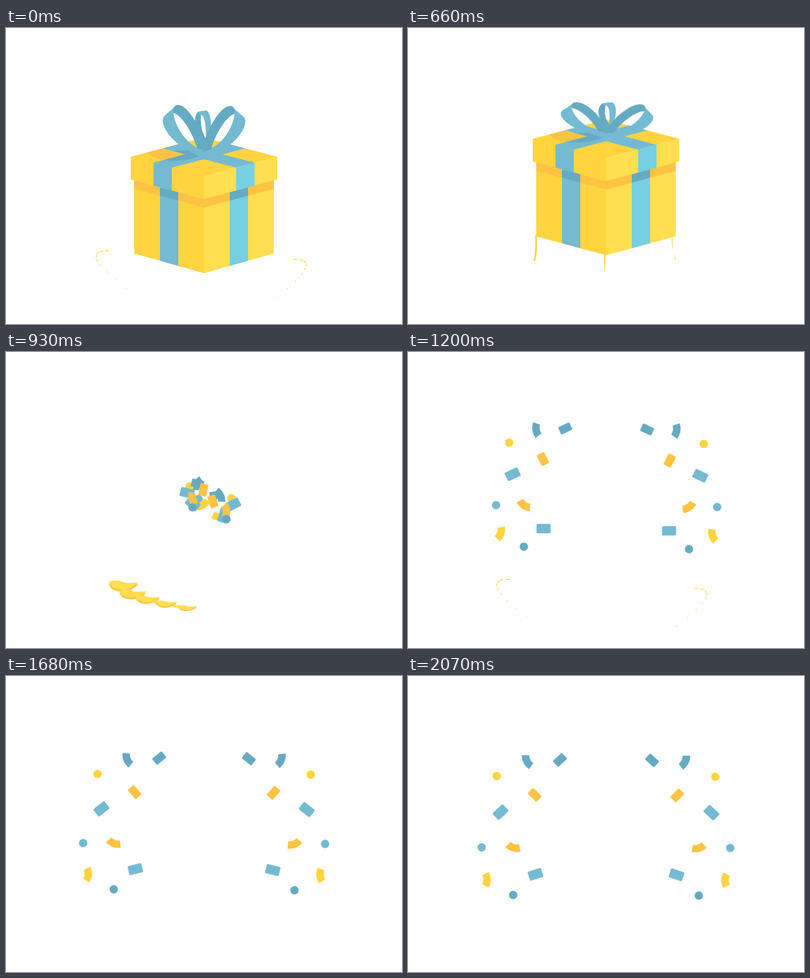
An HTML page that plays this animation: 800x600 px, repeating every 2.1 s.

```html
<!DOCTYPE html>
<html lang="en">
<head>
<meta charset="utf-8">
<title>Gift box</title>
<style>
  html, body { margin: 0; width: 100%; height: 100%; overflow: hidden; background: #fff; }
  svg { display: block; width: 800px; height: 600px; }
  svg * { animation: 2100ms linear 1ms infinite both; }

  .yellow { fill: #ffd43f; }
  .light { fill: #ffde50; }
  .orange { fill: #ffc344; }
  .blue { fill: #74bad2; }
  .sky { fill: #74d0e2; }
  .dark { fill: #65aac3; }

  /* Box: squash, jump, land, vanish */
  .box { animation-name: jump; }
  .lid { animation-name: squash; }
  .face { transform-origin: 400px 497px; animation-name: flatten; }
  .face.l { --skew: -3.65deg; }
  .face.r { --skew: 3.65deg; }
  @keyframes jump {
    0%, 27.14% { transform: translateY(0); animation-timing-function: ease-in; }
    31.43% { transform: translateY(-36.5px); animation-timing-function: cubic-bezier(.3,.4,.5,1); }
    37.14% { transform: translateY(-142px); animation-timing-function: cubic-bezier(.5,0,.9,.6); }
    42.8% { transform: translateY(0); opacity: 1; }
    42.85%, 100% { transform: translateY(0); opacity: 0; }
  }
  @keyframes squash {
    0% { transform: translateY(0); animation-timing-function: ease-in-out; }
    20%, 25.71% { transform: translateY(20.5px); animation-timing-function: ease-in; }
    30%, 100% { transform: translateY(0); }
  }
  @keyframes flatten {
    0% { transform: skewY(0deg); animation-timing-function: ease-in-out; }
    20%, 27.14% { transform: skewY(var(--skew)); }
    32.5%, 100% { transform: skewY(0deg); }
  }

  /* Bow: each loop drags behind the jump */
  .loop { transform-origin: 400px 250px; animation-name: drag; }
  .loop.l { --drag: matrix(1.058, -.055, .051, .702, 0, 0); }
  .loop.r { --drag: matrix(.977, .199, -.225, .751, 0, 0); }
  .loop.m { --drag: matrix(1.1, 0, -.08, .76, 0, 0); }
  @keyframes drag {
    0% { transform: matrix(1, 0, 0, 1, 0, 0); animation-timing-function: ease-in-out; }
    20%, 27.14% { transform: matrix(1, 0, 0, 1.03, 0, 0); }
    31.43%, 33% { transform: var(--drag); animation-timing-function: ease-in-out; }
    37.14% { transform: matrix(1, 0, 0, 1.02, 0, 0); }
    42.8%, 100% { transform: matrix(.92, 0, 0, 1.1, 0, 0); }
  }

  .trail { transform-box: fill-box; transform-origin: center bottom; animation-name: trail; }
  @keyframes trail {
    0%, 29.9% { opacity: 0; transform: none; }
    30%, 31.5% { opacity: 1; transform: none; }
    35% { opacity: 1; transform: scale(.1, .6); }
    35.1%, 100% { opacity: 0; transform: scale(.1, .6); }
  }

  /* Ground dust: thin flakes shrinking to specks */
  .ground { animation-name: ground; }
  .late { animation-name: late; }
  .flake { animation-name: flake; }
  @keyframes ground {
    0%, 20% { transform: translate(3px, -10px); }
    20.1%, 100% { transform: translate(0, 0); }
  }
  @keyframes late {
    0%, 20% { opacity: 1; }
    20.1%, 44.9% { opacity: 0; }
    45%, 100% { opacity: 1; }
  }
  @keyframes flake {
    0%, 1.3% { opacity: 1; transform: var(--end); }
    1.4%, 42.8% { opacity: 0; transform: var(--start); }
    42.85%, 44.29% { opacity: 1; transform: var(--start); animation-timing-function: cubic-bezier(.15,.7,.4,1); }
    54%, 58.4% { opacity: 1; transform: var(--end); }
    58.5%, 100% { opacity: 0; transform: var(--end); }
  }

  /* Confetti: burst, then drift to rest */
  .bit { animation-name: burst; }
  @keyframes burst {
    0%, 42.8% { opacity: 0; transform: translate(405px, 308px) rotate(var(--ar)); }
    42.85% { opacity: 1; transform: translate(405px, 308px) rotate(var(--ar)); }
    44.286% {
      transform: translate(var(--ax), var(--ay)) rotate(var(--ar));
      animation-timing-function: cubic-bezier(.25,.6,.35,1);
    }
    52.857% {
      transform: translate(calc(var(--bx) * 1.17 - var(--cx) * .17), calc(var(--by) * 1.17 - var(--cy) * .17))
        rotate(calc(var(--br) * 1.17 - var(--cr) * .17));
    }
    57.143% {
      transform: translate(var(--bx), var(--by)) rotate(var(--br));
      animation-timing-function: cubic-bezier(.25,.43,.6,.97);
    }
    98.571%, 100% { opacity: 1; transform: translate(var(--cx), var(--cy)) rotate(var(--cr)); }
  }
</style>
</head>
<body>
<svg viewBox="0 0 800 600">
  <defs>
    <clipPath id="top"><path d="M252 261L400 222L548 261L400 300Z"/></clipPath>
    <clipPath id="cross">
      <path d="M298 273L446 234L483 244L335 283Z"/>
      <path d="M502 273L354 234L317 244L465 283Z"/>
    </clipPath>
    <path id="shade" d="M286 252L314 244Q322 248 338 249Q360 250 375 246L394 259Q366 269 336 269Q298 268 286 252Z"/>
    <g id="loop">
      <path class="dark" d="M338 174C335 162 341 156 347 156C362 156 377 179 385 194C395 213 402 232 403 249L386 243C374 205 352 175 338 172Z"/>
      <path class="blue" d="M346 156L321 177C308 188 325 222 360 243L400 266L404 250L386 243C360 228 342 200 338 172C337 164 339 158 346 156Z"/>
    </g>
  </defs>

  <g class="yellow">
    <path class="trail" d="M257 420H260Q262 450 258 466L257 473L254 470Q258 452 257 420Z"/>
    <path class="trail" d="M396 459H399L398 497L396 480Z"/>
    <path class="trail" d="M533 424H534L535 450L533 438ZM537 457L541 470L539 470Z"/>
  </g>

  <g class="box">
    <g class="face l">
      <path class="yellow" d="M259 300V457L400 497V330Z"/>
      <path class="blue" d="M311 300V471.800L348 482.200V310Z"/>
    </g>
    <g class="face r">
      <path class="light" d="M541 300V457L400 497V330Z"/>
      <path class="sky" d="M489 300V471.800L452 482.200V310Z"/>
    </g>
    <g class="lid">
      <path class="orange" d="M259 300V326L400 364L541 326V300Z"/>
      <path class="dark" d="M311 300V340L348 350V300ZM489 300V340L452 350V300Z"/>
      <path class="yellow" d="M252 261L400 222L548 261L400 300V347L252 307Z"/>
      <use href="#shade" class="orange" clip-path="url(#top)"/>
      <path class="blue" d="M298 273L446 234L483 244L335 283Z"/>
      <path class="blue" d="M502 273L354 234L317 244L465 283Z"/>
      <use href="#shade" class="dark" clip-path="url(#cross)"/>
      <path class="light" d="M400 300L548 261V307L400 347Z"/>
      <path class="blue" d="M298 273L335 283V329.400L298 319.400Z"/>
      <path class="sky" d="M502 273L465 283V329.400L502 319.400Z"/>
      <g class="loop m">
        <path class="dark" d="M388 170C380 178 380 195 386 210L401 248L404 225C396 212 392 195 394 175Z"/>
        <path class="blue" d="M386 171Q388 169 404 167C414 168 418 205 410 222L403 235C405 215 404 180 394 175Q388 173 386 171Z"/>
      </g>
      <g class="loop l"><use href="#loop"/></g>
      <g class="loop r"><use href="#loop" transform="matrix(-1 0 0 1 800 2)"/></g>
    </g>
  </g>

  <g class="ground">
    <g id="dustL"></g>
    <g class="late"><g id="dustR" transform="matrix(-1 0 0 1 783 18)"></g></g>
  </g>
  <g id="confetti"></g>
</svg>

<script>
  const SVG = 'http://www.w3.org/2000/svg';

  function add(parent, tag, attrs) {
    const el = document.createElementNS(SVG, tag);
    for (const key in attrs) el.setAttribute(key, attrs[key]);
    return parent.appendChild(el);
  }

  const rect = (w, h) => ['rect', { x: -w / 2, y: -h / 2, width: w, height: h, rx: 2.5 }];
  const shapes = {
    dot: ['circle', { r: 8.5 }],
    small: rect(25, 16.5),
    big: rect(28.5, 19),
    arc: ['path', { d: 'M3.7-15.9A35 35 0 0 1 3.7 15.9L-9.7 9.1A20 20 0 0 0-9.7-9.1Z' }]
  };

  // shape, colour, resting angle and point on the left, head start
  const bits = [
    ['arc', 'dark', 153, 240.5, 173, .1],
    ['dot', 'yellow', 0, 179, 203, .15],
    ['small', 'dark', -43, 307, 170, .16],
    ['small', 'orange', 45, 256, 241, .01],
    ['big', 'blue', -43, 187, 276, .18],
    ['dot', 'blue', 0, 149, 347.5, .05],
    ['arc', 'yellow', 0, 159.5, 413, .01],
    ['big', 'blue', -18, 257.5, 402, .18],
    ['arc', 'orange', 106, 213, 348, .14],
    ['dot', 'dark', 0, 212.5, 444, .14]
  ];

  const pose = (name, x, y, angle) =>
    `--${name}x:${x}px;--${name}y:${y}px;--${name}r:${angle}deg;`;

  // Work back from the resting pose: still falling, then just launched
  function flight(angle, x, y, pace, right) {
    const turn = right ? -1 : 1;
    const fall = right ? .92 : 1;
    const bx = x + .115 * fall * (400 - x);
    const by = y - .125 * fall * (y - 50);
    const ax = 400 + (bx - 400) * (pace + (right ? .13 : 0));
    const ay = (right ? 316 : 293) + .2 * (by - 285);
    const spin = right ? 25 + .16 * y : 57;
    return pose('a', ax, ay, angle + turn * spin) +
      pose('b', bx, by, angle + turn * 18) +
      pose('c', x, y, angle);
  }

  const confetti = document.getElementById('confetti');
  for (const [shape, color, angle, x, y, pace] of bits) {
    const [tag, attrs] = shapes[shape];
    const left = flight(angle, x, y, pace, false);
    const right = flight(180 - angle, 800 - x, y + 1, pace, true);
    for (const style of [left, right]) add(confetti, tag, { ...attrs, class: 'bit ' + color, style });
  }

  const bezier = (p, q, r, t) => p * (1 - t) ** 2 + 2 * q * t * (1 - t) + r * t * t;
  const slope = (p, q, r, t) => (q - p) * (1 - t) + (r - q) * t;
  const place = (x, y, angle, w, h) =>
    `translate(${x}px,${y}px) rotate(${angle}rad) scale(${w},${h})`;

  // Flakes start under the box edge and end as specks along a hooked curve
  function flakePath(t, size) {
    const u = t ** 1.4;
    const hookX = [202, 142, 240, t], hookY = [461, 462, 538, t];
    const angle = Math.atan(slope(...hookY) / slope(...hookX));
    const start = place(238 + 129 * u, 474 + 45 * Math.sqrt(u), 0, (30 - 11 * t) * size, (10.5 - 5 * t) * size);
    const end = place(bezier(...hookX), bezier(...hookY), angle, 1 + 4 * (1 - t) ** 1.5, 1);
    return `--start:${start};--end:${end}`;
  }

  const leaf = 'M-1-.5Q-.9-1-.3-.9Q.1-.2 1-.6Q.6.6 0 .8Q-.8.9-1-.5Z';
  const count = 9;
  for (const id of ['dustL', 'dustR']) {
    const side = document.getElementById(id);
    for (let i = 0; i < count; i++) {
      const style = flakePath(i / (count - 1), i % 2 ? .4 : 1);
      const flake = add(side, 'g', { class: 'flake', style });
      add(flake, 'path', { d: leaf, class: 'orange', transform: 'translate(0 .3)' });
      add(flake, 'path', { d: leaf, class: 'light', transform: 'translate(0 -.1)' });
    }
  }
</script>
</body>
</html>
```
